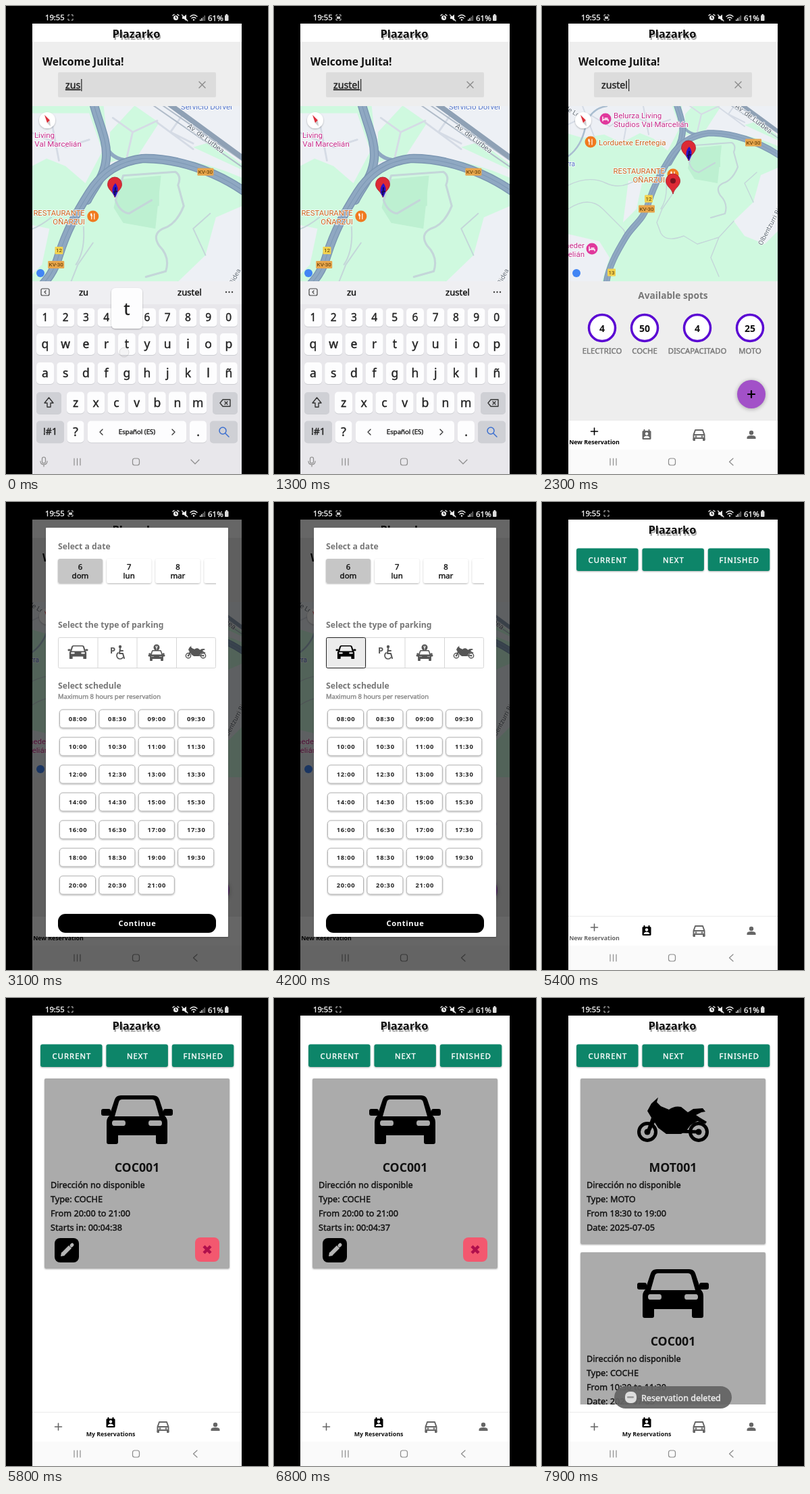
An HTML page for the animation above (8 s loop, 388 px wide and 692 px high).

```html
<!DOCTYPE html>
<html lang="es">
<head>
<meta charset="utf-8">
<style>
html, body { margin: 0; width: 100%; height: 100%; overflow: hidden; background: #000; }
svg { display: block; width: 388px; height: 692px; }
text { font-family: "Noto Sans", sans-serif; white-space: pre; }
.m { text-anchor: middle; }
.e { text-anchor: end; }
.b { font-weight: 700; }
.h { stroke-width: .4px; }
.line { fill: none; stroke-linecap: round; stroke-linejoin: round; }
.map text { font-family: Roboto, sans-serif; paint-order: stroke; stroke: #fff; stroke-width: 1.5px; }
.map .badge text { stroke: none; }
</style>
</head>
<body>
<svg id="stage" viewBox="0 0 388 692"></svg>
<script>
const LOOP = 8000;
// Class "h" gives a medium weight by stroking the letters in their own colour
const text = (x, y, s, size, cls = '', fill = '#111', extra = '') =>
  `<text x="${x}" y="${y}" font-size="${size}" class="${cls}" fill="${fill}" ${cls.includes('h') ? `stroke="${fill}"` : ''} ${extra}>${s}</text>`;
const rect = (x, y, w, h, fill, r = 0, extra = '') =>
  `<rect x="${x}" y="${y}" width="${w}" height="${h}" rx="${r}" fill="${fill}" ${extra}/>`;
const disc = (x, y, r, fill, extra = '') => `<circle cx="${x}" cy="${y}" r="${r}" fill="${fill}" ${extra}/>`;
const line = (d, color, w = 1.5, extra = '') =>
  `<path class="line" d="${d}" stroke="${color}" stroke-width="${w}" ${extra}/>`;
const shape = (d, fill, extra = '') => `<path d="${d}" fill="${fill}" ${extra}/>`;
const group = (id, body, extra = '') => `<g id="${id}" ${extra}>${body}</g>`;
const at = (x, y, k, body) => `<g transform="translate(${x} ${y}) scale(${k})">${body}</g>`;
const range = n => [...Array(n).keys()];
const shadow = 'filter="url(#shadow)"';

// Icons, drawn around their own centre
const car = c => shape(`M-24-36H24Q31-36 33-30L41-6Q45-2 45 4V33Q45 36 42 36H31Q28 36 28 33V23H-28V33
  Q-28 36-31 36H-42Q-45 36-45 33V4Q-45-2-41-6L-33-30Q-31-36-24-36Z
  M-22-30H22Q26-30 27-26L33-5H-33L-27-26Q-26-30-22-30Z
  M-34 1H-20Q-17 1-17 5T-20 9H-34Q-37 9-37 5T-34 1ZM34 1H20Q17 1 17 5T20 9H34Q37 9 37 5T34 1Z`, c, 'fill-rule="evenodd"')
  + rect(-53, -16, 14, 10, c, 3) + rect(39, -16, 14, 10, c, 3);
const tabCar = c => line('M-8 7V0L-5.500-7H5.500L8 0V7M-8 0H8M-8 5H8', c, 2) + disc(-4.5, 2.6, 1.3, c) + disc(4.5, 2.6, 1.3, c) + rect(-9, 5, 3.5, 4, c, 1) + rect(5.5, 5, 3.5, 4, c, 1);
const bike = c => [-38, 38].map(x => disc(x, 18, 12.5, 'none', `stroke="${c}" stroke-width="5"`) + disc(x, 18, 4.5, c)).join('')
  + shape('M-38-13L-32-24-22-33-24-26-18-20-6-15Q2-21 12-19L22-11 30-16 44-17 48-12 42-11 34-7 40-3 50 3 48 6 36 2 26 8 20 16 12 21H-10L-22 12-27 4-34 18-39 16-32-3Z', c)
  + line('M8 17L38 18', c, 5);
const person = c => disc(0, -3, 3.2, c) + shape('M-6.500 6V4Q-6.500 1 0 1T6.500 4V6Z', c);
const agenda = c => rect(-6.5, -6, 13, 13, c, 1.5) + rect(-4.5, -8, 2, 3, c) + rect(2.5, -8, 2, 3, c)
  + disc(0, -1.5, 2.2, '#fff') + shape('M-4.3 5Q-4 1.8 0 1.8T4.3 5Z', '#fff');
const plus = (c, w = 1.6) => line('M-5 0H5M0-5V5', c, w);
const wheelchair = c => text(-11, 2, 'P', 13, 'b', c) + disc(4, -8, 2.2, c)
  + line('M4-5L3 2H8L10 9M4-2H8', c, 2) + line('M1 1A5 5 0 1 0 8 8', c, 1.7);
const electric = c => at(0, 5, .22, car(c)) + disc(0, -7, 4.5, c) + line('M-1-9V-7H1V-9M0-7V-4', '#fff', 1) + line('M-11 5H11', c, 3);

const systemBar = (y, back, fill) => rect(39, y, 310, 692 - y, fill)
  + line('M101 669V679M105.500 669V679M110 669V679', '#8c8c8c', 1.2)
  + rect(187.5, 669, 10, 10, 'none', 3, 'stroke="#8c8c8c" stroke-width="1.2"') + line(back, '#8c8c8c', 1.2);

// World coordinates equal the zoomed-out screen coordinates
const green = '#cff9df', urban = '#edf0f5';
const world = () => rect(-200, 0, 800, 700, green)
  + ['M30 140H190L204 180 186 214 165 196 145 188 118 202 92 190 60 195 30 186Z', 'M204 120H360V212Q300 184 245 186L212 196Z',
    'M352 238L324 250 313 290 284 318 300 340 330 352 352 330Z', 'M30 335L85 348 100 372 88 410H30Z',
    'M128 258L148 262 140 300 120 320Z'].map(d => shape(d, urban)).join('')
  + ['M212 160L238 132 264 150 242 184 212 192Z', 'M300 176L352 200V194L320 170Z'].map(d => shape(d, green)).join('')
  + ['M222 210L266 206 260 262 226 256 216 240Z', 'M243 216H264V238H243Z'].map(d => shape(d, '#bdf0d1')).join('')
  + line('M218 232L226 206 281 202Q288 206 284 216L290 238Q282 258 268 262 256 268 264 280 276 292 271 307L250 313M218 232Q222 244 232 246L256 232', '#c4d6d9', 2.2)
  + line('M39 300Q70 280 90 300T120 330 104 380M39 265Q70 250 95 262T150 250M176 300Q186 285 184 260M194 277L178 300 170 320 176 336Q184 350 210 340L230 352 262 342M284 318L262 342 250 372 262 400M313 290L300 262 318 246', '#c4d6d9', 1.4)
  + line('M39 175L70 160 100 178 128 160 165 176 190 168M60 148L78 195M128 160L120 204M150 148L158 190M215 145L236 160 262 148M236 160L230 186M262 150L300 178M290 140L276 160 300 172', '#d5dbe5', 2)
  + line('M39 222Q58 208 64 180T96 148', '#a9bdd0', 2.5)
  + line('M255 130L352 197M262 128L352 190', '#b1bcc9', 1.4) + line('M274 130L356 190', '#8fa1b5', 5.5)
  + line('M207 172Q212 189 232 190', '#8fa8c2', 4)
  + ['M190 110C196 145 210 165 208 188C206 208 196 216 188 232',
    'M95 412C98 385 112 362 124 342S150 318 158 290C166 265 176 246 190 224C204 202 222 191 246 188C280 187 322 200 356 224',
  ].map(d => line(d, '#7b96b2', 9.5) + line(d, '#8fa8c2', 7.5) + line(d, '#7f9ab6', .8)).join('');

const pin = c => disc(0, 0, 8.5, c);
const bed = pin('#e0389c') + line('M-4-3V3M-4 1H4V3M-1-1H3', '#fff', 1.4);
const fork = pin('#f07a1f') + line('M-2-4V4M2-4V4M-3-4V-1H-1', '#fff', 1.2);
const badge = (s, w, c, tc) => `<g class="badge">${rect(-w / 2, -5.5, w, 11, c, 1)}${text(0, 3, s, 8, 'm', tc)}</g>`;
const marker = shape('M0 0C-2-9-10.500-11-10.500-19.500A10.500 10.500 0 0 1 10.500-19.500C10.500-11 2-9 0 0Z', '#dd2a35', 'stroke="#a81d28" stroke-width=".8"');
const road = '#5d6875', pink = '#c42a8a', orange = '#c7621b', ink = '#513200';
const labels = [
  [94, 167, bed + text(12, -1, 'Belurza Living', 11.5, '', pink) + text(12, 12, 'Studios Val Marcelián', 11.5, '', pink)],
  [72, 201, group('eatery', fork + text(12, 5, 'Lorduetxe Erretegia', 11.5, '', orange))],
  [194, 249, fork + text(-12, -1, 'RESTAURANTE', 11.3, 'e', orange) + text(-12, 12, 'OÑARZUI', 11.3, 'e', orange)],
  [74, 359, bed + text(-11, -1, 'Olmeder', 11.5, 'e', pink) + text(-11, 12, 'Marcelián', 11.5, 'e', pink)],
  [314, 133, text(0, 4, 'Servicio Dorvel', 11.5, 'm', '#4d6fc4')],
  [313, 167, `<g transform="rotate(37)">${text(0, 3, 'Av. de Lurbea', 11, 'm', road)}</g>`],
  [323, 353, `<g transform="rotate(-62)">${text(0, 3, 'Olbentzurri Bidea', 10, '', road)}</g>`],
  [54, 165, `<g transform="rotate(30)">${text(0, 0, 'Cam. de Lo', 10, 'e', road)}</g>`],
  [49, 237, text(0, 0, 'Ibarra', 10, 'e', '#4d6fc4')],
  [313, 202, badge('KV-30', 24, '#e8a64c', ink)], [155, 300, badge('KV-30', 24, '#e8a64c', ink)],
  [158, 285, badge('12', 12, '#f2d250', ink)], [103, 394, badge('13', 12, '#f2d250', ink)],
  [217, 229, marker + shape('M1-21Q6-15 4-7L1 0-3-6Q-5-15 1-21Z', '#2a12c8') + line('M1-14L0-4M3-9L-1-8', '#150a55', 2)],
  [194, 278, group('found', marker + disc(0, -19.5, 4, '#7c1420'))],
];

const key = (x, y, w, s, dark, size = 17.5) =>
  rect(x - w / 2, y - 15, w, 32, '#cdced3', 5) + rect(x - w / 2, y - 16, w, 32, dark ? '#cfd0d5' : '#fdfdfe', 5) + text(x, y + size * .35, s, size, 'm h', '#222');
const row = (s, x, y) => [...s].map((c, i) => key(x + i * 30.2, y, 26, c)).join('');
const keyboard = rect(39, 407, 310, 285, '#e8e7eb') + rect(39, 407, 310, 34, '#efeff2')
  + rect(52, 418, 12, 10, 'none', 2, 'stroke="#444" stroke-width="1.2"') + line('M59 421L57 423 59 425', '#444', 1.2)
  + text(115, 427.5, 'zu', 13, 'm h') + text(272, 427.5, 'zustel', 13, 'm h')
  + [326, 330.5, 335].map(x => disc(x, 423, 1.2, '#444')).join('')
  + range(10).map(i => rect(45 + i * 30.2, 448, 26, 27, '#cdced3', 5) + rect(45 + i * 30.2, 447, 26, 27, '#fdfdfe', 5)
    + text(58 + i * 30.2, 466, (i + 1) % 10, 15.5, 'm h', '#222')).join('')
  + row('qwertyuiop', 58, 500) + row('asdfghjklñ', 58, 543) + row('zxcvbnm', 103, 586.5)
  + key(63.5, 587, 37, '', 1) + line('M63.500 579L57 587H61V593H66V587H70Z', '#333', 1.4)
  + key(324.5, 587, 37, '', 1) + line('M317 587L321 582H332V592H321ZM324 585L328 589M328 585L324 589', '#333', 1.4)
  + key(65.5, 629.5, 41, '!#1', 1, 14) + key(103, 629.5, 25, '?') + key(194, 629.5, 146, 'Español (ES)', 0, 9.6) + key(284.5, 629.5, 25, '.') + key(322.5, 629.5, 41, '', 1)
  + line('M143 626L139 630 143 634M246 626L250 630 246 634', '#333', 1.3) + rect(302, 614, 41, 32, '#a9adb5', 5, 'id="search"')
  + disc(321, 628, 5, 'none', 'stroke="#3b6fd0" stroke-width="1.5"') + line('M325 632L330 637', '#3b6fd0', 1.5)
  + systemBar(656, 'M274 671L280 677 286 671', '#e8e7eb') + rect(53.5, 667, 5, 9, 'none', 2.5, 'stroke="#8c8c8c" stroke-width="1.2"') + line('M51 673Q51 678 56 678T61 673M56 678V681', '#8c8c8c', 1.2)
  + group('popup', rect(-23, -83, 46, 60, '#fdfdfe', 6, shadow) + text(0, -43, '', 25, 'm h', '#222', 'id="popupChar"'));

const spots = rect(39, 407, 310, 206, '#eeeeee') + text(194, 433, 'Available spots', 13.7, 'm b', '#777')
  + [[89, 4, 'ELECTRICO'], [152, 50, 'COCHE'], [230, 4, 'DISCAPACITADO'], [308, 25, 'MOTO']].map(([x, n, s]) =>
    disc(x, 476, 19.5, '#fff', 'stroke="#5b08d3" stroke-width="3.5"') + text(x, 481.5, n, 14, 'm b') + text(x, 513.5, s, 11.3, 'm h', '#777')).join('')
  + disc(310, 575, 21, '#000', 'opacity=".3" filter="url(#blur)"') + disc(310, 574, 21, '#a251c8') + disc(310, 574, 21, '#fff', 'id="ripple"') + at(310, 574, 1, plus('#000', 2.2));

const home = rect(39, 53, 310, 560, '#eeeeee') + text(54, 88, 'Welcome Julita!', 15.6, 'b')
  + rect(77, 98, 234, 37, '#dcdcdc', 2) + text(88, 122, '', 14.2, 'h', '#222', 'id="query"')
  + rect(0, 108, 1.2, 18, '#222', 0, 'id="caret"') + line('M286 112L295 121M295 112L286 121', '#8a8a8a', 1.4)
  + `<g class="map" clip-path="url(#mapClip)">${group('world', world())}${labels.map(l => `<g class="label">${l[2]}</g>`).join('')}
    ${disc(61, 169, 12, '#fff', shadow)}${shape('M57 161L65 169 61 173Z', '#dc2f3a')}${shape('M65 169L66 178 61 173Z', '#ccc')}${disc(51, 395, 6, '#4285f4')}</g>` + spots;

const tabs = rect(39, 612, 310, 44, '#fff') + rect(39, 612, 310, .6, '#ddd')
  + group('tabNew', plus('currentColor')) + text(77.5, 648, 'New Reservation', 8.8, 'm b', 'currentColor', 'id="labelNew"')
  + group('tabMine', agenda('currentColor')) + text(155, 648, 'My Reservations', 8.8, 'm b', '#111', 'id="labelMine"')
  + at(232.5, 634, 1, tabCar('#666')) + at(310, 634, 1, person('#666')) + systemBar(656, 'M283 669L277.500 674 283 679', '#fafafa');

const card = (y, h, icon, name, rows) => rect(57, y, 274, h, '#ababab', 2, shadow) + at(194, y + 61, 1, icon('#000'))
  + text(194, y + 138, name, 17.7, 'm b') + rows.map((s, i) => text(66, y + 162 + i * 21, s, 12.7, 'h', '#111', s.includes('Starts') ? 'id="timer"' : '')).join('');
const noAddress = 'Dirección no disponible', day = 'Date: 2025-07-05';
const mine = rect(39, 53, 310, 560, '#fff')
  + ['CURRENT', 'NEXT', 'FINISHED'].map((s, i) => rect(51 + i * 97.4, 68.5, 91.5, 33.5, '#0d8569', 3, shadow)
    + text(97.5 + i * 97.4, 90, s, 11.2, 'm h', '#fff', 'letter-spacing="1.1"')).join('')
  + `<g clip-path="url(#listClip)">`
  + group('booked', card(119, 281, car, 'COC001', [noAddress, 'Type: COCHE', 'From 20:00 to 21:00', 'Starts in: 00:04:38'])
    + rect(72, 355, 36, 36, '#000', 8) + line('M84 379L95 368', '#b5b5b5', 6, 'style="stroke-linecap:butt"') + shape('M81 382L82 376 87 381Z', '#b5b5b5') + line('M97 366L98 365', '#b5b5b5', 5)
    + rect(280, 354, 36, 36, '#f3586f', 8) + line('M293 367L303 377M303 367L293 377', '#b00f4c', 4.5, 'style="stroke-linecap:butt"'))
  + group('rest', card(119, 245, bike, 'MOT001', [noAddress, 'Type: MOTO', 'From 18:30 to 19:00', day])
    + card(376, 245, car, 'COC001', [noAddress, 'Type: COCHE', 'From 10:30 to 11:30', day])) + '</g>';
const toast = rect(107, 574, 174, 33, '#646464', 16.5, 'opacity=".93"') + rect(123, 582, 17, 17, '#ddd', 7) + rect(126, 589, 10, 2.5, '#999', 1) + text(147, 595.5, 'Reservation deleted', 12.6, 'h', '#eee');

const dialog = rect(39, 26, 310, 666, '#000', 0, 'opacity=".6"') + rect(59, 38, 270, 605, '#fff', 1, shadow)
  + text(77, 70, 'Select a date', 12.2, 'b', '#777')
  + `<g clip-path="url(#dateClip)">` + [[6, 'dom'], [7, 'lun'], [8, 'mar'], ['', '']].map(([n, d], i) => {
    const x = 77 + i * 72.2;
    return rect(x, 84, 66, 36, i ? '#fff' : '#c6c6c6', 3, shadow) + text(x + 33, 99.5, n, 11.3, 'm h') + text(x + 33, 113, d, 11.5, 'm h');
  }).join('') + '</g>'
  + text(77, 186, 'Select the type of parking', 12.2, 'b', '#777') + rect(77.5, 200.5, 233, 45, '#fff', 2, 'stroke="#d6d6d6"')
  + line('M136 201V245M194 201V245M252.500 201V245', '#d6d6d6', 1)
  + rect(77.5, 200.5, 58, 45, '#ececec', 2, 'id="carCell" stroke="#222"')
  + group('carIcon', at(106.5, 222, .28, car('currentColor'))) + at(165, 222, 1, wheelchair('#555')) + at(223, 222, 1, electric('#555')) + at(281, 222, .29, bike('#555'))
  + text(77, 276, 'Select schedule', 12.2, 'b', '#777') + text(77, 291, 'Maximum 8 hours per reservation', 9.5, 'h', '#888')
  + range(27).map(i => {
    const x = 79.5 + i % 4 * 58.4, y = 307 + (i >> 2) * 41, label = `${String(8 + (i >> 1)).padStart(2, 0)}:${i % 2 ? '30' : '00'}`;
    return `<g class="slot">${rect(x, y, 53, 27, '#fff', 4.5, 'stroke="#b2b2b2" ' + shadow)}${text(x + 27, y + 17, label, 9.4, 'm b', '#222', 'letter-spacing=".7"')}</g>`;
  }).join('')
  + rect(77, 609, 234, 28, '#000', 11, 'id="continue"') + text(194.5, 627, 'Continue', 11.1, 'm b', '#fff', 'letter-spacing=".7"');

const status = text(58, 21, '19:55', 11.2, 'h', '#eee') + line('M92 15V13H94M97 13H99V15M99 19V21H97M94 21H92V19', '#ccc', 1)
  + rect(93, 15.5, 5, 3.5, '#ccc', 0, 'id="capture"')
  + disc(251.5, 17.5, 3.6, '#eee') + line('M247 14L249 12.500M256 14L254 12.500', '#eee', 1.5) + line('M251.500 15.500V18H253', '#000', 1)
  + shape('M261 15.500H263.500L267 12.500V22L263.500 19H261Z', '#eee') + line('M260.500 13L269 22', '#eee', 1.2)
  + line('M273 15.500Q278 11 283 15.500M275 18Q278 15.500 281 18', '#eee', 1.4) + disc(278, 20.5, 1.2, '#eee')
  + range(4).map(i => rect(287 + i * 2.2, 20 - i * 2, 1.4, 2 + i * 2, i < 2 ? '#eee' : '#777')).join('')
  + text(299, 21.5, '61%', 11.5, 'h', '#eee') + rect(324, 13.5, 5.5, 8.5, '#ddd', 1) + rect(325.5, 12, 2.5, 2, '#ddd');

const clip = (id, x, y, w, h) => `<clipPath id="${id}">${rect(x, y, w, h, '#000')}</clipPath>`;
const stage = document.getElementById('stage');
stage.innerHTML = `<defs>${clip('phone', 39, 26, 310, 666)}${clip('mapClip', 39, 148, 310, 259)}${clip('listClip', 50, 110, 290, 491)}${clip('dateClip', 75, 80, 236, 45)}
  <filter id="shadow" x="-20%" y="-20%" width="140%" height="150%"><feDropShadow dx="0" dy="1" stdDeviation="1" flood-opacity=".3"/></filter>
  <filter id="blur" x="-30%" y="-30%" width="160%" height="160%"><feGaussianBlur stdDeviation="3"/></filter></defs>`
  + rect(0, 0, 388, 692, '#000') + status + `<g clip-path="url(#phone)">` + rect(39, 26, 310, 27, '#fff')
  + text(194.5, 49.5, 'Plazarko', 16.4, 'm b', '#aaa') + text(193, 47, 'Plazarko', 16.4, 'm b')
  + group('home', home) + group('mine', mine) + tabs + group('keyboard', keyboard) + group('dialog', dialog) + group('toast', toast)
  + disc(0, 0, 7, '#888', 'id="tap" fill-opacity=".08" stroke="#999" stroke-opacity=".3"') + '</g>';

const el = id => document.getElementById(id);
const show = (id, opacity) => { el(id).style.opacity = +opacity; };
const move = (node, x, y, k = 1) => node.setAttribute('transform', `translate(${x} ${y}) scale(${k})`);
const progress = (t, a, b) => Math.min(1, Math.max(0, (t - a) / (b - a)));
const ease = p => p * p * (3 - 2 * p);
const labelNodes = document.querySelectorAll('.label'), slots = document.querySelectorAll('.slot');

const typing = [[0, 'zus'], [100, 'zust'], [400, 'zuste'], [700, 'zustel']];
const popups = [[0, 100, 't', 179, 500], [300, 400, 'e', 118, 500], [600, 700, 'l', 300, 544]];
const slotTimes = [4300, 4600, 4800];
const taps = [[0, 175, 512], [300, 118, 510], [600, 300, 552], [1000, 322, 630], [2500, 310, 574], [3700, 106, 222],
  [4300, 106, 566], [4600, 164, 566], [4800, 223, 566], [4950, 194, 623], [7500, 298, 372]];

function draw(t) {
  el('query').textContent = typing.findLast(s => t >= s[0])[1];
  el('query').setAttribute('text-decoration', t < 1800 ? 'underline' : 'none');
  el('caret').setAttribute('x', 89 + el('query').getComputedTextLength());
  const popup = popups.find(p => t >= p[0] && t < p[1]);
  show('popup', !!popup);
  if (popup) { el('popupChar').textContent = popup[2]; move(el('popup'), popup[3], popup[4]); }
  show('search', t >= 1000 && t < 1250 ? .6 : 0);
  move(el('keyboard'), 0, 290 * ease(progress(t, 1750, 2050)));

  const zoom = ease(progress(t, 1800, 2250)), k = 1.4 - .4 * zoom, cx = 161 + 56 * zoom, cy = 283 - 54 * zoom;
  move(el('world'), cx - 217 * k, cy - 229 * k, k);
  labels.forEach(([x, y], i) => move(labelNodes[i], cx + (x - 217) * k, cy + (y - 229) * k));
  show('eatery', zoom);
  show('found', t >= 1900);
  show('ripple', t >= 2500 ? .35 * (1 - progress(t, 2500, 2800)) : 0);

  show('dialog', t < 5300 ? progress(t, 2920, 3080) : 0);
  show('carCell', progress(t, 3700, 3800));
  el('carIcon').style.color = t < 3700 ? '#555' : '#000';
  slotTimes.forEach((time, i) => {
    const [box, label] = slots[24 + i].children, on = t >= time;
    box.setAttribute('fill', on ? '#c4c4c4' : '#fff');
    label.setAttribute('fill', on ? '#f4f4f4' : '#222');
  });
  el('continue').setAttribute('fill', t >= 4950 && t < 5100 ? '#333' : '#000');

  const away = t >= 5300, tab = ease(progress(t, 5400, 5600));
  show('home', !away);
  show('mine', away);
  move(el('tabNew'), 77.5, 629 + 5 * tab);
  move(el('tabMine'), 155, 634 - 6 * tab);
  el('tabNew').style.color = el('labelNew').style.color = away ? '#666' : '#000';
  el('tabMine').style.color = away ? '#000' : '#666';
  show('labelNew', 1 - tab);
  show('labelMine', tab);
  show('booked', t < 7600 ? progress(t, 5500, 5700) : 0);
  el('timer').textContent = `Starts in: 00:04:${37 - Math.floor((t - 6300) / 1000)}`;
  show('rest', t >= 7600);
  show('toast', progress(t, 7680, 7850));
  show('capture', t % 1000 >= 100 && t % 1000 < 350);

  const tap = taps.find(p => t >= p[0] && t < p[0] + 150);
  show('tap', !!tap);
  if (tap) move(el('tap'), tap[1], tap[2]);
}

const start = performance.now();
(function tick() {
  draw((performance.now() - start) % LOOP);
  requestAnimationFrame(tick);
})();
</script>
</body>
</html>
```
